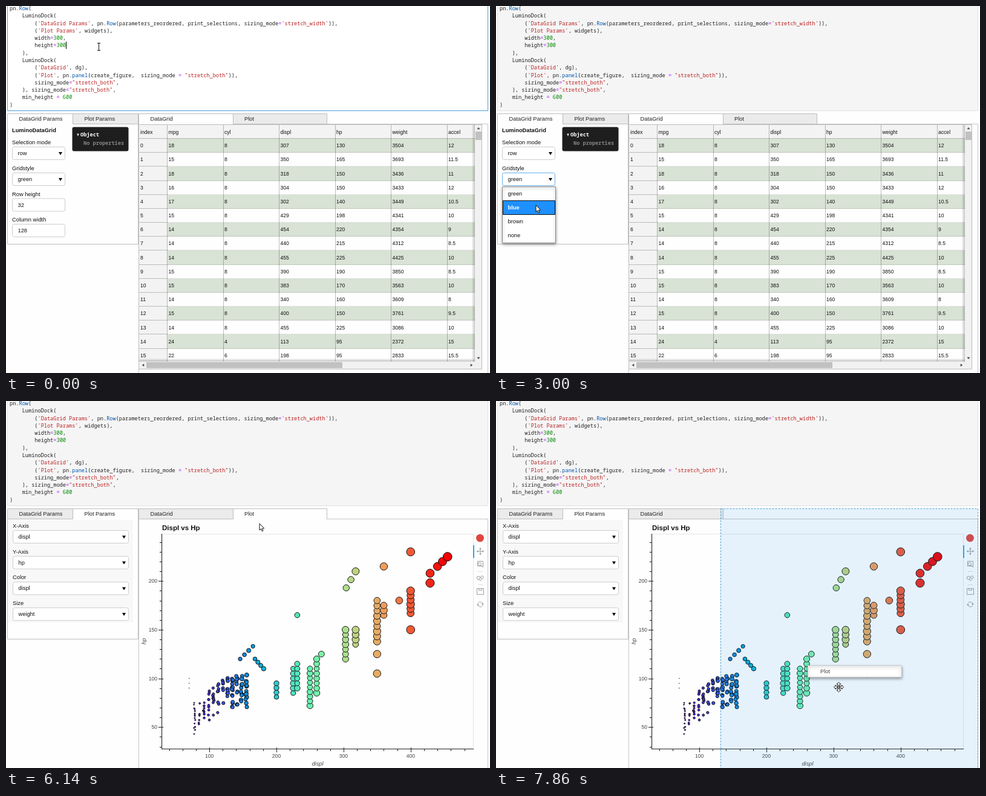
Write an HTML page with a canvas that moves like this. It is 800x608 px and loops after 8 s.

```html
<!DOCTYPE html>
<html lang="en">
<head>
<meta charset="utf-8">
<title>Dock layout demo</title>
<style>
html, body { margin: 0; width: 100%; height: 100%; overflow: hidden; background: #fefefe; }
canvas { display: block; }
</style>
</head>
<body>
<canvas id="stage" width="800" height="608"></canvas>
<script>
const ctx = document.getElementById('stage').getContext('2d');
const LOOP = 8000, STEP = 1000 / 7;
const SANS = '"Liberation Sans", Arial, sans-serif';
const MONO = '"Noto Sans Mono", "DejaVu Sans Mono", monospace';
const UI = '9.3px ' + SANS, CELL = '8.6px ' + SANS, CODE_FONT = '8.61px ' + MONO;
const PAGE = '#fefefe';

// Moments (ms) at which the interface changes state
const BLUR = 400, MENU_OPEN = 2250, MENU_PICK = 3690, PARAMS_TAB = 4950,
      PLOT_TAB = 5500, DRAG = 6700, DROP_ZONE = 6900;

// Pointer stops: arrival time, departure time, x, y
const STOPS = [[0, 1140, 153, 67], [2000, 2300, 62, 288], [2900, 3720, 66, 330], [4700, 4960, 163, 186],
  [5350, 5560, 400, 187], [6140, 6140, 419, 203], [6450, 6600, 450, 188], [7000, 7000, 459, 344], [7860, 8000, 566, 474]];

const CODE = `pn.Row(
    LuminoDock(
        ('DataGrid Params', pn.Row(parameters_reordered, print_selections, sizing_mode='stretch_width')),
        ('Plot Params', widgets),
        width=300,
        height=300
    ),
    LuminoDock(
        ('DataGrid', dg),
        ('Plot', pn.panel(create_figure,  sizing_mode = "stretch_both")),
        sizing_mode="stretch_both",
    ), sizing_mode="stretch_both",
    min_height = 600
)`.split('\n');

// The text shown in the grid; the cylinder count follows from the displacement
const COLUMNS = ['mpg', 'cyl', 'displ', 'hp', 'weight', 'accel'];
const ROWS = `18 307 130 3504 12
15 350 165 3693 11.5
18 318 150 3436 11
16 304 150 3433 12
17 302 140 3449 10.5
15 429 198 4341 10
14 454 220 4354 9
14 440 215 4312 8.5
14 455 225 4425 10
15 390 190 3850 8.5
15 383 170 3563 10
14 340 160 3609 8
15 400 150 3761 9.5
14 455 225 3086 10
24 113 95 2372 15
22 198 95 2833 15.5`.split('\n').map(row => {
  const [mpg, displ, ...rest] = row.split(' ');
  return [mpg, displ > 250 ? 8 : displ > 150 ? 6 : 4, displ, ...rest];
});

// Scatter: a seeded cloud of small engines, then columns of common displacements [displ, low hp, high hp]
const STACKS = [[70, 90, 100], [200, 81, 95], [225, 85, 110], [231, 90, 115], [250, 72, 110], [260, 85, 120],
  [303, 120, 150], [318, 135, 150], [350, 138, 180], [360, 165, 175], [400, 167, 190]];
// Rare engines, as runs from one point to another [displ, hp, displ, hp, count]
const RUNS = [[146, 120, 165, 133, 4], [168, 120, 181, 110, 4], [231, 165, 267, 125, 2], [350, 105, 350, 125, 2],
  [304, 193, 318, 210, 3], [360, 215, 400, 230, 2], [383, 180, 400, 150, 2], [429, 198, 429, 208, 2], [440, 215, 455, 225, 3]];

function makePoints() {
  let seed = 7;
  const random = () => (seed = seed * 16807 % 2147483647) / 2147483647;
  const points = [];
  const add = (d, hp) => points.push([d, hp, .345 * Math.sqrt(d - 69) * (.9 + random() * .2)]);
  const run = (d0, hp0, d1, hp1, n) => {
    for (let i = 0; i < n; i++) add(d0 + (d1 - d0) * i / (n - 1), hp0 + (hp1 - hp0) * i / (n - 1));
  };
  for (let i = 0; i < 130; i++) {
    const d = 77 + Math.floor(random() * 12) * 7 + random() * 2;
    const center = 59 + 29 * Math.min(1, (d - 77) / 43);
    add(d, center + (random() + random() - 1) * 20);
  }
  for (const [d, low, high] of STACKS) run(d, low, d, high, Math.round((high - low) / 5) + 1);
  for (const ends of RUNS) run(...ends);
  return points;
}
const POINTS = makePoints();

const mix = (a, b, u) => a + (b - a) * u;
const ease = (t, from, to) => {
  const u = Math.min(1, Math.max(0, (t - from) / (to - from)));
  return u * u * (3 - 2 * u);
};
function pointerAt(t) {
  let [x, y] = STOPS[0].slice(2);
  STOPS.slice(1).forEach(([arrive, , nextX, nextY], i) => {
    const u = ease(t, STOPS[i][1], arrive);
    x = mix(x, nextX, u); y = mix(y, nextY, u);
  });
  return [x, y];
}

function text(s, x, y, font = UI, color = '#111', align = 'left') {
  ctx.font = font; ctx.fillStyle = color; ctx.textAlign = align;
  ctx.fillText(s, x, y + 3);
}
function fill(x, y, w, h, color) { ctx.fillStyle = color; ctx.fillRect(x, y, w, h); }
function paint(color, border) {
  if (color) { ctx.fillStyle = color; ctx.fill(); }
  if (border) { ctx.strokeStyle = border; ctx.lineWidth = 1; ctx.stroke(); }
}
function box(x, y, w, h, color, border, radius = 0) {
  ctx.beginPath();
  ctx.roundRect(x + .5, y + .5, w - 1, h - 1, radius);
  paint(color, border);
}
function shape(coords, color, border, close = true) {
  ctx.beginPath();
  for (let i = 0; i < coords.length; i += 2) ctx.lineTo(coords[i], coords[i + 1]);
  if (close) ctx.closePath();
  paint(color, border);
}
function circle(x, y, r, color, border) {
  ctx.beginPath(); ctx.arc(x, y, r, 0, Math.PI * 2);
  paint(color, border);
}
function turned(x, y, angle, draw) {
  ctx.save(); ctx.translate(x, y); ctx.rotate(angle);
  draw();
  ctx.restore();
}
function arrow(x, y, angle, size, color) {
  turned(x, y, angle, () => shape([-size, size / 2, size, size / 2, 0, -size / 2 - 1], color));
}
function withShadow(draw) {
  ctx.save();
  ctx.shadowColor = 'rgba(0,0,0,.4)'; ctx.shadowBlur = 5; ctx.shadowOffsetY = 2;
  draw();
  ctx.restore();
}

function tokenColor(token, isProperty) {
  if (/^['"]/.test(token)) return '#ba2121';
  if (/^\d/.test(token)) return '#080';
  if (token === '=') return '#a2f';
  return isProperty ? '#05a' : '#222';
}
function drawCode(focused) {
  box(2, -5, 795, 179, focused ? '#fff' : '#f5f5f5', focused ? '#4a9fdf' : '#e0e0e0');
  CODE.forEach((line, row) => {
    for (const m of line.matchAll(/'[^']*'|"[^"]*"|\d+|=|\w+|[^\w'"=]+/g))
      text(m[0], 6 + m.index * 5.166, 4 + row * 12.28, CODE_FONT, tokenColor(m[0], line[m.index - 1] === '.'));
  });
  if (focused) fill(99, 59, 1, 12, '#000');
}

function tab(x, w, label, labelX, active, hover) {
  box(x, 178, w, 18, active ? PAGE : hover ? '#f8f8f8' : '#ebebeb', '#bdbdbd');
  if (active) fill(x + 1, 194, w - 2, 3, PAGE);
  text(label, labelX, 186.5, UI, '#222');
}

function field(label, value, x, w, y, select = true, focused = false) {
  text(label, x, y - 18);
  box(x, y - 11, w, 22, '#fff', focused ? '#66afe9' : '#ccc', 3);
  text(value, x + 9.5, y);
  if (select) shape([x + w - 11, y - 2, x + w - 5, y - 2, x + w - 8, y + 3], '#000');
}

function drawLeft(t, pointer) {
  const plotParams = t >= PARAMS_TAB;
  box(2, 195, 217, 200, PAGE, '#bdbdbd');
  tab(2, 109, 'DataGrid Params', 21.5, !plotParams);
  tab(110, 109, 'Plot Params', 129.5, plotParams, pointer[0] > 110 && pointer[0] < 219 && pointer[1] > 178 && pointer[1] < 196);
  if (plotParams) {
    fill(3, 197, 207, 170, '#f8f8f8');
    ['X-Axis displ', 'Y-Axis hp', 'Color displ', 'Size weight'].forEach((entry, i) =>
      field(...entry.split(' '), 11, 192, 225 + i * 42.7));
    return;
  }
  text('LuminoDataGrid', 10, 206, 'bold ' + UI);
  const open = t >= MENU_OPEN && t < MENU_PICK;
  field('Selection mode', 'row', 10, 88, 244);
  field('Gridstyle', t < MENU_PICK ? 'green' : 'blue', 10, 88, 287, true, open);
  field('Row height', '32', 10, 88, 329.5, false);
  field('Column width', '128', 10, 88, 372, false);
  box(109, 200, 94, 41, '#1e1e1f', null, 3);
  shape([117, 211.5, 121, 211.5, 119, 216], '#ddd');
  text('Object', 123, 213, 'bold ' + CODE_FONT, '#fff');
  text('No properties', 128, 227, 'bold ' + CODE_FONT, '#858585');
  if (open) drawMenu(pointer);
}

function drawMenu(pointer) {
  withShadow(() => box(10, 299, 89, 94, '#fff', '#888'));
  const hovered = pointer[1] >= 322 ? 1 : 0;
  ['green', 'blue', 'brown', 'none'].forEach((name, i) => {
    const y = 311 + i * 23.1;
    if (i === hovered) box(11, Math.round(y - 12), 87, 24, '#1e90ff', '#101010');
    text(name, 19.5, y, (i === hovered ? 'bold ' : '') + UI, i === hovered ? '#fff' : '#111');
  });
}

function drawGrid(blue) {
  const top = 220, rowH = 23.17, colX = i => 267 + i * 92.5;
  ctx.save();
  ctx.beginPath(); ctx.rect(220, 197, 555, 392); ctx.clip();
  fill(220, 197, 555, 23, '#f3f3f3');
  fill(220, 220, 47, 370, '#f3f3f3');
  ROWS.forEach((row, r) => {
    const y = Math.round(top + r * rowH), next = Math.round(top + (r + 1) * rowH);
    const textY = top + r * rowH + 11.3;
    if (r % 2 === 0) fill(267, y, 508, next - y, blue ? 'rgba(138,172,200,.3)' : 'rgba(64,115,53,.2)');
    fill(267, next - 1, 508, 1, 'rgba(20,20,20,.13)');
    fill(220, next - 1, 47, 1, 'rgba(20,20,20,.25)');
    text(r, 222, textY, CELL);
    row.forEach((value, c) => {
      if (blue && c % 2 === 0) fill(Math.round(colX(c)), y, 92, next - y, 'rgba(100,100,100,.11)');
      text(value, colX(c) + 1.5, textY, CELL);
    });
  });
  text('index', 222, 208.5, CELL);
  COLUMNS.forEach((name, c) => {
    text(name, colX(c) + 1.5, 208.5, CELL);
    fill(Math.round(colX(c)) - 1, 197, 1, 392, 'rgba(20,20,20,.28)');
  });
  fill(220, 219, 555, 1, 'rgba(20,20,20,.28)');
  for (let i = 0; i < 5; i++) {
    const shade = `rgba(0,0,0,${.2 - i * .04})`;
    fill(774 - i, 197, 1, 392, shade);
    fill(220, 588 - i, 555, 1, shade);
  }
  ctx.restore();
  fill(775, 197, 12, 404, '#f1f1f1');
  fill(220, 589, 567, 12, '#f1f1f1');
  fill(776, 208, 10, 14, '#c1c1c1');
  fill(232, 590, 324, 10, '#c1c1c1');
  arrow(781, 203, 0, 2.5, '#505050');
  arrow(781, 583, Math.PI, 2.5, '#505050');
  arrow(227, 595, -Math.PI / 2, 2.5, '#505050');
  arrow(769, 595, Math.PI / 2, 2.5, '#505050');
  box(219, 196, 568, 406, null, '#bdbdbd');
}

function rainbow(d) {
  const u = (d - 68) / 387;
  const channels = [Math.abs(2 * u - .5), Math.sin(Math.PI * u) ** 1.2, Math.cos(Math.PI * u / 2)];
  return `rgb(${channels.map(v => Math.round(Math.min(1, v) * 240))})`;
}

function drawPlot() {
  const px = d => 225.2 + d * 1.109, py = hp => 620.9 - hp * 1.613;
  box(258, 220, 515, 357, PAGE, '#e5e5e5');
  text('Displ vs Hp', 258, 211, 'bold 11.5px ' + SANS);
  for (const [d, hp, r] of POINTS) circle(px(d), py(hp), r, rainbow(d), '#111');
  fill(257, 220, 1, 357, '#222');
  fill(258, 576, 515, 1, '#222');
  for (let d = 40; d <= 480; d += 20) {
    const major = d % 100 === 0;
    fill(Math.round(px(d)), major ? 574 : 577, 1, major ? 8 : 3, '#222');
    if (major) text(d, px(d), 588, CELL, '#444', 'center');
  }
  for (let hp = 30; hp <= 240; hp += 10) {
    const major = hp % 50 === 0;
    fill(major ? 252 : 254, Math.round(py(hp)), major ? 8 : 3, 1, '#222');
    if (major) text(hp, 250, py(hp), CELL, '#444', 'right');
  }
  text('displ', 515, 601, 'italic ' + UI, '#444', 'center');
  turned(228, 398, -Math.PI / 2, () => text('hp', 0, 0, 'italic ' + UI, '#444', 'center'));
  drawToolbar();
}

function drawToolbar() {
  const gray = '#a0a0a0';
  circle(783.5, 227, 6.5, '#e0463e');
  fill(772, 239, 2, 21, '#26aae1');
  for (let i = 0; i < 4; i++) turned(784, 249, i * Math.PI / 2, () => {
    fill(-.5, -4, 1, 4, gray);
    arrow(0, -4.5, 0, 2, gray);
  });
  box(779, 265, 10, 9, null, gray);
  circle(783, 270, 2.5, '#fff', gray);
  shape([785, 272, 789, 276], null, gray, false);
  fill(780, 282, 8, 1, '#ddd');
  circle(781, 293, 2.7, null, gray);
  circle(787, 292, 2.2, null, gray);
  shape([782, 295, 784, 298, 787, 295], null, gray, false);
  fill(780, 304, 8, 1, '#ddd');
  box(778, 310, 12, 11, null, gray);
  box(781, 310, 6, 4, null, gray);
  for (const angle of [0, Math.PI]) turned(784, 337, angle, () => {
    ctx.beginPath(); ctx.arc(0, 0, 4, .4, 2.9); paint(null, gray);
    arrow(-4, .5, 0, 2, gray);
  });
}

function drawRight(t) {
  const plot = t >= PLOT_TAB;
  box(219, 195, 578, 430, PAGE, '#c6c6c6');
  tab(219, 157, 'DataGrid', 238.5, !plot);
  if (t < DRAG) tab(375, 156, 'Plot', 394, plot);
  if (plot) drawPlot(); else drawGrid(t >= MENU_PICK);
}

// The drop zone grows from the top part to the whole dock, then shrinks to the right half
function drawDrag(t, pointer) {
  if (t >= DROP_ZONE) {
    const left = Math.round(mix(219, 508, ease(t, 7715, 7990)));
    const bottom = Math.round(mix(419, 620, ease(t, 7290, 7430)));
    ctx.setLineDash([3, 2]);
    box(left, 178, 797 - left, bottom - 178, 'rgba(33,150,230,.11)', '#4a9fd0');
    ctx.setLineDash([]);
  }
  const lag = ease(t, 7000, 7860);
  const x = Math.round(pointer[0] - mix(75, 51, lag)), y = Math.round(pointer[1] - mix(22, 36, lag));
  withShadow(() => box(x, y, 156, 20, '#fff', '#c8c8c8'));
  text('Plot', x + 21, y + 10, UI, '#444');
}

function drawPointer(t, [x, y]) {
  if (t >= DRAG) {
    for (let i = 0; i < 4; i++) turned(x + .5, y, i * Math.PI / 2, () =>
      shape([-1.5, -2, -1.5, -5, -3.5, -5, 0, -8, 3.5, -5, 1.5, -5, 1.5, -2], '#fff', '#222'));
    circle(x + .5, y, 1.5, '#fff', '#222');
  } else if (y < 174) {
    x = Math.round(x); y = Math.round(y);
    fill(x, y - 5, 1, 11, '#111');
    fill(x - 2, y - 6, 5, 1, '#111');
    fill(x - 2, y + 6, 5, 1, '#111');
  } else {
    shape([0, 0, 0, 11, 2.5, 8.8, 4.3, 12.8, 6, 12, 4.3, 8.2, 7.7, 8].map((v, i) => v + (i % 2 ? y : x)), '#fff', '#111');
  }
}

function render(t) {
  const pointer = pointerAt(t);
  fill(0, 0, 800, 608, PAGE);
  drawCode(t < BLUR);
  drawRight(t);
  drawLeft(t, pointer);
  if (t >= DRAG) drawDrag(t, pointer);
  drawPointer(t, pointer);
}

// The picture advances seven times a second
function tick() {
  const time = performance.now() % LOOP;
  render(Math.floor((time + 3) / STEP) * STEP);
  requestAnimationFrame(tick);
}
tick();
</script>
</body>
</html>
```
